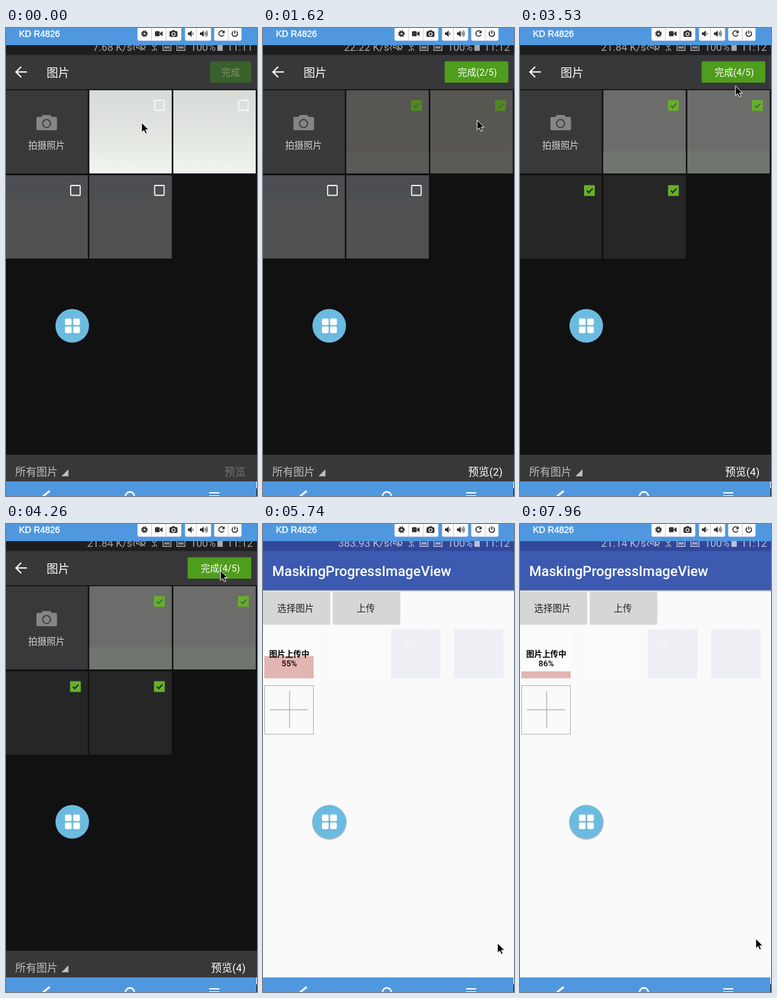
Write an HTML page that moves like this. It is 396 px wide and 737 px high and loops after 8 s.

```html
<!DOCTYPE html>
<html lang="zh-CN">
<head>
<meta charset="utf-8">
<style>
  html, body { margin: 0; width: 100%; height: 100%; overflow: hidden; background: #111112; }
  svg { display: block; width: 396px; height: 737px; font-family: Roboto, 'Noto Sans CJK SC', 'Noto Sans CJK', sans-serif; }
</style>
</head>
<body>
<svg id="stage" viewBox="0 0 396 737">
  <defs>
    <linearGradient id="pale" x2="0" y2="1">
      <stop offset="0" stop-color="#d8dcd8"/><stop offset=".45" stop-color="#e0e3df"/><stop offset="1" stop-color="#f0f5ee"/>
    </linearGradient>
    <linearGradient id="shade" x2="0" y2="1">
      <stop offset="0" stop-color="#000" stop-opacity=".22"/><stop offset="1" stop-color="#000" stop-opacity="0"/>
    </linearGradient>
  </defs>
  <g id="screen"></g>
  <g id="frame"></g>
  <g id="cursor"><path d="M0 0V15.5L3.6 12.2L6 17.6L8.6 16.5L6.2 11.2H11Z" fill="#000" stroke="#fff"/></g>
</svg>
<script>
const LOOP = 8000, STEP = 147.1, SWITCH = 30;
const BLUE = '#4f98e0';
const $ = id => document.getElementById(id);

// Step-indexed keys: [step, value, ...]
const CURSOR = [[0, 214, 149], [3, 240, 119], [4, 240, 119], [7, 377, 122], [10, 377, 122],
  [16, 142, 260], [18, 238, 254], [20, 103, 254], [22, 103, 254], [24, 340, 91], [27, 339, 74],
  [30, 338, 73], [34, 384, 706], [37, 373, 676], [38, 370, 668], [39, 370, 660], [42, 372, 653]];
const PROGRESS = [[30, 9], [39, 55], [46, 71], [52, 83], [54, 86]];
const SPEED = [[0, '7.68'], [2, '379.58'], [9, '22.22'], [23, '21.84'], [30, '27.95'], [37, '383.93'], [49, '21.14']];
const TILES = [
  { x: 131.5, y: 98, pick: 4, pale: true },
  { x: 264, y: 98, pick: 10, pale: true },
  { x: 0, y: 232, pick: 22 },
  { x: 131.5, y: 232, pick: 18 }
];

const last = (keys, k) => keys.filter(p => p[0] <= k).pop();
function mix(keys, k) {
  const a = last(keys, k), b = keys[keys.indexOf(a) + 1];
  if (!b) return a.slice(1);
  const u = (k - a[0]) / (b[0] - a[0]);
  return a.slice(1).map((v, i) => v + (b[i + 1] - v) * u);
}

const rect = (x, y, w, h, fill, more = '') =>
  `<rect x="${x}" y="${y}" width="${w}" height="${h}" fill="${fill}" ${more}/>`;
const text = (s, x, y, size, fill, more = '') =>
  `<text x="${x}" y="${y}" font-size="${size}" fill="${fill}" ${more}>${s}</text>`;
const line = (d, color, w, more = '') =>
  `<path d="${d}" fill="none" stroke="${color}" stroke-width="${w}" ${more}/>`;
const END = 'text-anchor="end"', MID = 'text-anchor="middle"';

function status(k) {
  const main = k >= SWITCH, c = main ? '#b9c1dc' : '#a6a6a8';
  const sim = x => `<g transform="translate(${x} 25)">` +
    line('M.7 0V10.3H13.3V0M4 3V8M7 3V8M10 3V8M3 5.5H11', c, 1.4) + '</g>';
  return rect(0, 27, 396, 15.5, main ? '#31489a' : '#1e1e20') +
    text(last(SPEED, k)[1] + ' K/s', 199, 36, 16.5, c, END) +
    line('M201 25L203 28L200.5 31L203 35M206 27H209L214 24V35L209 31H206ZM205 24L219 35M217 27L220 30L217 33', c, 1.3) +
    line('M231 27L234 30L237 27M234 31V36M232 34L230 36M236 32L238 36', c, 1.3) +
    sim(247) + sim(269) +
    text('100%', 291, 36, 16.5, c) + rect(333.5, 25, 8.5, 11, c) +
    text(k < 9 ? '11:11' : '11:12', 348.5, 36, 16.5, c);
}

function tile({ x, y, pick, pale }, k) {
  const on = k >= pick, cx = x ? x + 102.5 : 101.5, cy = y + 15.5;
  const dark = k < 12 ? '#575652' : '#6c6c6a';
  const fill = pale ? (on ? dark : 'url(#pale)') : on ? '#262627' : '#515153';
  let s = rect(x, y, x ? 130 : 129, 131, fill);
  if (pale && on) s += rect(x, 194, 130, 35, k < 12 ? '#5a5a56' : '#71756f');
  if (!pale && !on) s += rect(x, y, x ? 130 : 129, 37, '#4d4e51');
  return s + (on
    ? rect(cx - .5, cy, 17, 17, pale && k < 12 ? '#4f8a1f' : '#66b02a', 'rx="1"') +
      line(`M${cx + 4} ${cy + 8.5}l3 3.2l6-6.5`, pale ? '#55604c' : '#222', 2)
    : rect(cx + .5, cy + .5, 15, 15.5, 'none', `rx="1" stroke="${pale ? '#f6f8f5' : '#f2f2f2'}" stroke-width="1.8"`));
}

function picker(k) {
  const n = TILES.filter(t => k >= t.pick).length;
  return rect(0, 42, 396, 672, '#111112') +
    rect(0, 42, 396, 54.5, '#38383b') +
    line('M33 69.3H16M24 61L15.7 69.3L24 77.6', '#fff', 2.1) +
    text('图片', 64, 76.5, 18.2, '#fff') +
    (n ? rect(286.5, 52.5, 100.5, 33.5, '#4f9d1c', 'rx="2"') + text(`完成(${n}/5)`, 369, 75, 14.6, '#fff', END)
       : rect(322, 52.5, 65, 33.5, '#3a602b', 'rx="2"') + text('完成', 369, 75, 14.6, '#7c9770', END)) +
    rect(0, 98, 129, 131, '#39393b') +
    `<path d="M50 140H56L58 137H70L72 140H78Q80.500 140 80.500 142.500V159Q80.500 161 78 161H50Q48 161 48 159V142Q48 140 50 140Z" fill="#858587"/>` +
    '<circle cx="64" cy="150.500" r="6.300" fill="#858587" stroke="#39393b" stroke-width="1.800"/>' +
    text('拍摄照片', 35, 189.5, 14.5, '#d2d2d3') +
    TILES.map(t => tile(t, k)).join('') +
    rect(0, 672, 396, 42, '#38383b') +
    text('所有图片', 14.5, 704.5, 16.8, '#bebebf') +
    '<path d="M98.500 695V706H87.500Z" fill="#bebebf"/>' +
    text(n ? `预览(${n})` : '预览', 378, 704.5, 16.8, n ? '#fff' : '#747477', END);
}

function uploader(k) {
  const p = Math.round(mix(PROGRESS, k)[0]), top = 165 + 78 * p / 100;
  const button = (x, w, s) => rect(x, 109, w, 50, '#000', 'rx="2" opacity=".1"') +
    rect(x, 107, w, 50.5, '#d6d6d6', 'rx="2"') + text(s, x + w / 2 - 1, 138, 14.5, '#222', MID);
  const thumb = x => rect(x, 166, 78, 77, '#eeeff4');
  return rect(0, 42, 396, 672, '#fafafa') +
    rect(0, 42, 396, 62.5, '#3c5ab0') + rect(0, 104.5, 396, 3, 'url(#shade)') +
    text('MaskingProgressImageView', 14.5, 82, 22, '#fff', 'font-weight="500"') +
    button(-1, 107, '选择图片') + button(110, 106.5, '上传') +
    rect(102, 165, 78, 78, '#fcfcfc') + thumb(202) + thumb(301.5) +
    line('M224 185.500h8M258 167h3M266 172h2M308 173h2M356 168h4M376 171h2', '#fff', 1.3) +
    rect(2, 165, 78, top - 165, '#fcfcfc') + rect(2, top, 78, 243 - top, '#e3b5b1') +
    text('图片上传中', 41.5, 208.5, 12.7, '#000', MID + ' font-weight="700"') +
    text(p + '%', 41.5, 223.5, 13, '#000', MID + ' font-weight="500"') +
    rect(2.5, 254.5, 77, 76.5, 'none', 'stroke="#adadad"') +
    line('M42 263V321M11 292.500H71', '#b4b4b4', 1.4);
}

function bubble(k) {
  const sq = (x, y) => rect(x, y, 10.5, 10.5, '#fff', 'rx="2"');
  const rim = k >= SWITCH ? '<circle cx="104.700" cy="470" r="27.400" fill="#000" opacity=".25"/>' : '';
  return rim + '<circle cx="104.500" cy="469" r="26.500" fill="#6bbbe0"/>' +
    sq(93, 457.5) + sq(106, 457.5) + sq(93, 470) + sq(106, 470);
}

function frame() {
  const ink = '#333';
  const group = (x, w, seps) => rect(x, -5, w, 25, '#fdfdfd', 'rx="2.500" stroke="#b9c4d0" stroke-width=".6"') +
    seps.map(v => line(`M${v} 0V19.500`, '#ccc', 1)).join('');
  const speaker = x => `<path d="M${x} 7H${x + 2.5}L${x + 6} 4V14L${x + 2.5} 11H${x}Z" fill="${ink}"/>`;
  return rect(0, 0, 396, 27, BLUE) +
    text('KD R4826', 20.5, 14, 14, '#fff', `style="font-family:'Liberation Sans',sans-serif" stroke="#fff" stroke-width=".4"`) +
    group(207.5, 69, [229.5, 252.5]) + group(282.5, 41, [300.5]) + group(328.5, 43, [350.5]) +
    `<circle cx="218.500" cy="9" r="2.800" fill="none" stroke="${ink}" stroke-width="2.400"/>` +
    `<circle cx="218.500" cy="9" r="4.500" fill="none" stroke="${ink}" stroke-width="1.800" stroke-dasharray="1.760"/>` +
    rect(235, 5, 7.5, 8, ink, 'rx="1.500"') + `<path d="M243 8L247 5V13L243 10Z" fill="${ink}"/>` +
    rect(258, 5, 12.5, 9, ink, 'rx="1.500"') + rect(261.5, 3.5, 5.5, 3, ink, 'rx="1"') +
    '<circle cx="264.300" cy="9.500" r="2.500" fill="none" stroke="#fff" stroke-width="1.200"/>' +
    speaker(287) + line('M294.500 7Q296 9 294.500 11', ink, 1.1) +
    speaker(306) + line('M313.500 7Q315 9 313.500 11M315 5.500Q317.500 9 315 12.500M316 3.500Q320 9 316 14', ink, 1) +
    line('M343.500 6A4.300 4.300 0 1 0 344 10.500', ink, 1.6) + `<path d="M345 3.500V8.200H340.300Z" fill="${ink}"/>` +
    line('M358.500 5.500A4.300 4.300 0 1 0 363.500 5.500M361 3.500V9', ink, 1.6) +
    rect(0, 714, 395, 23, BLUE) + rect(395, 714, 1, 11, '#fff') +
    line('M69 729L56 739.500', '#fff', 3) +
    '<circle cx="195.500" cy="737.500" r="7" fill="none" stroke="#fff" stroke-width="2.400"/>' +
    line('M320.500 732H336.500M320.500 737H336.500', '#fff', 2.2);
}

function draw(k) {
  let body;
  if (k < SWITCH) body = picker(k);
  else {
    body = uploader(k);
    // The closing picker is still faintly visible while it shrinks away
    if (k === SWITCH) body += `<g opacity=".065" transform="translate(198 370) scale(.98) translate(-198 -370)">${picker(k)}</g>`;
    body += rect(395, 725, 1, 12, '#111');
  }
  $('screen').innerHTML = body + status(k) + bubble(k);
  $('cursor').setAttribute('transform', `translate(${mix(CURSOR, k).join(' ')})`);
}

$('frame').innerHTML = frame();
let shown = -1;
function tick(now) {
  const k = Math.floor(now % LOOP / STEP + .05);
  if (k !== shown) draw(shown = k);
  requestAnimationFrame(tick);
}
draw(0);
requestAnimationFrame(tick);
</script>
</body>
</html>
```
